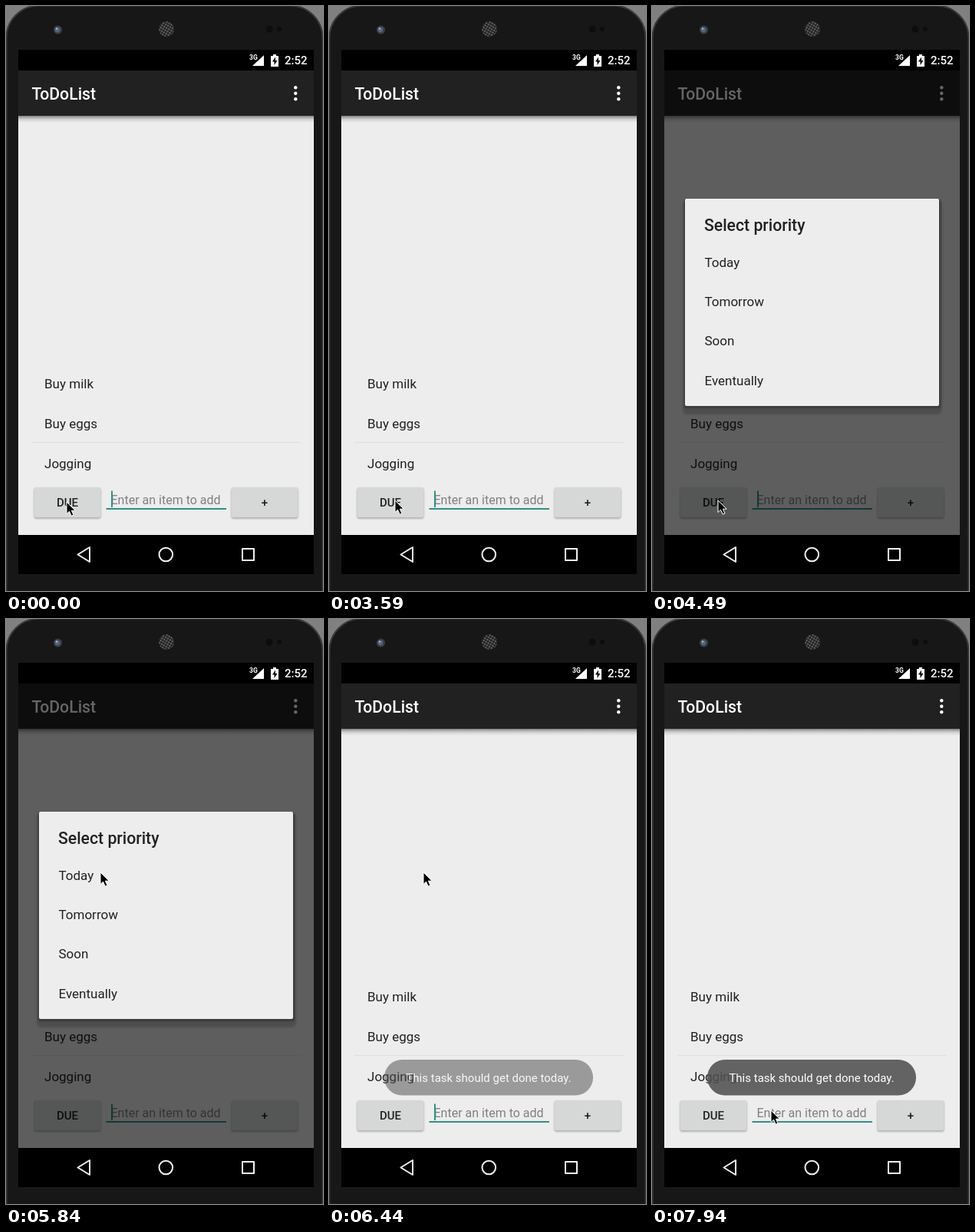
Write an HTML page that moves like this. It is 413x762 px and loops after 8000 ms.

```html
<!DOCTYPE html>
<html lang="en">
<head>
<meta charset="utf-8">
<title>To-do list on a phone</title>
<style>
  html, body { margin: 0; width: 100%; height: 100%; overflow: hidden; background: #808080; }
  svg { display: block; width: 413px; height: 762px; }
  text { font-family: Roboto, sans-serif; font-size: 17px; fill: #212121; }
  .medium { font-weight: 500; }
  .small { font-size: 15px; }
  .title { font-size: 21.2px; }
  .white { fill: #fff; }
  .mid { text-anchor: middle; }
</style>
</head>
<body>
<svg viewBox="0 0 413 762">
  <defs>
    <linearGradient id="fade" x2="0" y2="1">
      <stop offset="0" stop-color="#5c5659" stop-opacity=".75"/>
      <stop offset=".5" stop-color="#8b8488" stop-opacity=".3"/>
      <stop offset="1" stop-color="#999" stop-opacity="0"/>
    </linearGradient>
    <pattern id="mesh" width="3.4" height="3.4" patternUnits="userSpaceOnUse" patternTransform="rotate(30)">
      <circle cx="1.7" cy="1.7" r="1.1" fill="#6a6a6a"/>
    </pattern>
    <filter id="soft"><feGaussianBlur stdDeviation="1"/></filter>
    <g id="button">
      <rect x="-.5" y="1" width="87" height="40" rx="3" fill="#000" opacity=".25" filter="url(#soft)"/>
      <rect width="86" height="39" rx="2"/>
    </g>
  </defs>

  <!-- phone body -->
  <rect x=".5" y="-.5" width="412" height="840" rx="42" fill="#171717" stroke="#3a3a3a" stroke-width="2"/>
  <circle cx="67.5" cy="31" r="5.5" fill="#39404a"/>
  <circle cx="67" cy="31" r="3.2" fill="#56657f"/>
  <circle cx="66" cy="29.5" r="1.2" fill="#a9b6cc"/>
  <circle cx="209" cy="30" r="10" fill="#242424"/>
  <circle cx="209" cy="30" r="10" fill="url(#mesh)"/>
  <circle cx="343" cy="30" r="4.5" fill="#0d0d0d"/>
  <circle cx="356" cy="30" r="3" fill="#0d0d0d"/>

  <!-- status bar -->
  <path d="M16 57h385v683H16z"/>
  <text x="317" y="70" class="white" font-weight="700" style="font-size:8.5px">3G</text>
  <path d="M336 64v14h-15z" fill="#fff"/>
  <path d="M328 71.500l8-7.500h-8z" fill="#000" opacity=".5"/>
  <path d="M345 65h3v-2h4v2h3v14h-10z" fill="#fff"/>
  <path d="M351 66.500l-4 6h2.500v4.500l4-6H351z"/>
  <text x="363" y="76.300" class="white small medium">2:52</text>

  <!-- app -->
  <path d="M16 143h385v546H16z" fill="#ededed"/>
  <path d="M16 143h385v9H16z" fill="url(#fade)"/>
  <path d="M16 84h385v59H16z" fill="#212121"/>
  <text x="33.500" y="121.800" class="white title medium">ToDoList</text>
  <g fill="#fff">
    <circle cx="377.300" cy="106.300" r="2.200"/>
    <circle cx="377.300" cy="113.800" r="2.200"/>
    <circle cx="377.300" cy="121.200" r="2.200"/>
  </g>
  <text x="50" y="497.500">Buy milk</text>
  <text x="50" y="549.500">Buy eggs</text>
  <text x="50" y="601.500">Jogging</text>
  <path d="M33 568.500h351" stroke="#dfdfdf"/>
  <use id="due" href="#button" x="37" y="627" fill="#d6d7d7"/>
  <use href="#button" x="294" y="627" fill="#d6d7d7"/>
  <text x="80" y="652" class="mid small medium">DUE</text>
  <text x="337" y="652" class="mid small medium">+</text>
  <text x="136.500" y="648.500" style="font-size:16px;fill:#808080">Enter an item to add</text>
  <path d="M130.500 655h156.500" stroke="#2b9186" stroke-width="2"/>
  <path id="caret" d="M138 631.500v21.500" stroke="#2b9186" stroke-width="2"/>

  <rect id="dim" x="16" y="84" width="385" height="605"/>

  <g id="dialog">
    <rect id="wide" x="35" y="248" width="349" height="290" rx="9" opacity=".13" filter="url(#soft)"/>
    <rect x="40" y="252" width="338" height="280" rx="6" opacity=".16" filter="url(#soft)"/>
    <rect x="42" y="252" width="334" height="272" rx="3" opacity=".25" filter="url(#soft)"/>
    <rect x="43" y="251" width="331" height="270" rx="2" fill="#ededed"/>
    <text x="68" y="293.300" class="title medium">Select priority</text>
    <text x="68.500" y="340">Today</text>
    <text x="68.500" y="391">Tomorrow</text>
    <text x="68.500" y="442.300">Soon</text>
    <text x="68.500" y="493.500">Eventually</text>
  </g>

  <g id="toast">
    <rect x="72" y="574" width="272" height="46.500" rx="23" fill="#505050" opacity=".88"/>
    <text x="208" y="603" class="white mid small">This task should get done today.</text>
  </g>

  <!-- navigation bar -->
  <g fill="none" stroke="#f2f2f2" stroke-width="2" stroke-linejoin="round">
    <path d="M93.500 714.500l15.500-9.500v19z"/>
    <circle cx="208.300" cy="714.500" r="8.800"/>
    <path d="M308 707h15v15h-15z"/>
  </g>

  <g id="pointer">
    <path d="M0 0v15.500l3.500-3.300 2.700 6 2.800-1.200-2.600-5.800h4.800z" fill="#000" stroke="#fff" stroke-linejoin="round"/>
  </g>
</svg>
<script>
  const LOOP = 8000, STEP = 150, OFFSET = 140;
  const $ = id => document.getElementById(id);

  // Value of the last [time, value] key reached
  const hold = (keys, t) => keys.reduce((v, [at, next]) => t >= at ? next : v, 0);

  const caret = [[0, 1], [590, 0], [1040, 1], [1640, 0], [2090, 1], [2690, 0], [3140, 1],
    [3740, 0], [4190, 1], [6890, 0], [7340, 1], [7940, 0]];
  const dim = [[4190, .2], [4340, .52], [4490, .6], [6290, .32], [6440, 0]];
  const dialog = [[4190, .4], [4340, 1], [6290, .08], [6440, 0]];
  const toast = [[6290, .08], [6440, .6], [6590, .9], [6740, 1]];

  // Pointer moves: start, end, target x and y
  const moves = [[3140, 3590, 86, 644], [5090, 5840, 123, 330], [7190, 7940, 155, 640]];

  function pointerAt(t) {
    let x = 79, y = 646;
    for (const [from, to, tx, ty] of moves) {
      const p = Math.min(1, Math.max(0, (t - from) / (to - from)));
      const e = p * p * (3 - 2 * p);
      x += (tx - x) * e;
      y += (ty - y) * e;
    }
    return `translate(${x.toFixed(1)} ${y.toFixed(1)})`;
  }

  function draw(ms) {
    const t = Math.max(0, Math.floor((ms % LOOP - OFFSET) / STEP) * STEP + OFFSET);
    const show = (id, keys) => $(id).setAttribute('opacity', hold(keys, t));
    show('caret', caret);
    show('dim', dim);
    show('dialog', dialog);
    show('toast', toast);
    show('wide', [[4190, .13], [4490, 0]]);
    $('due').setAttribute('fill', t >= 3740 && t < 4490 ? '#cbcdcd' : '#d6d7d7');
    $('pointer').setAttribute('transform', pointerAt(t));
  }

  const start = performance.now();
  function tick() {
    draw(performance.now() - start);
    requestAnimationFrame(tick);
  }
  tick();
</script>
</body>
</html>
```
